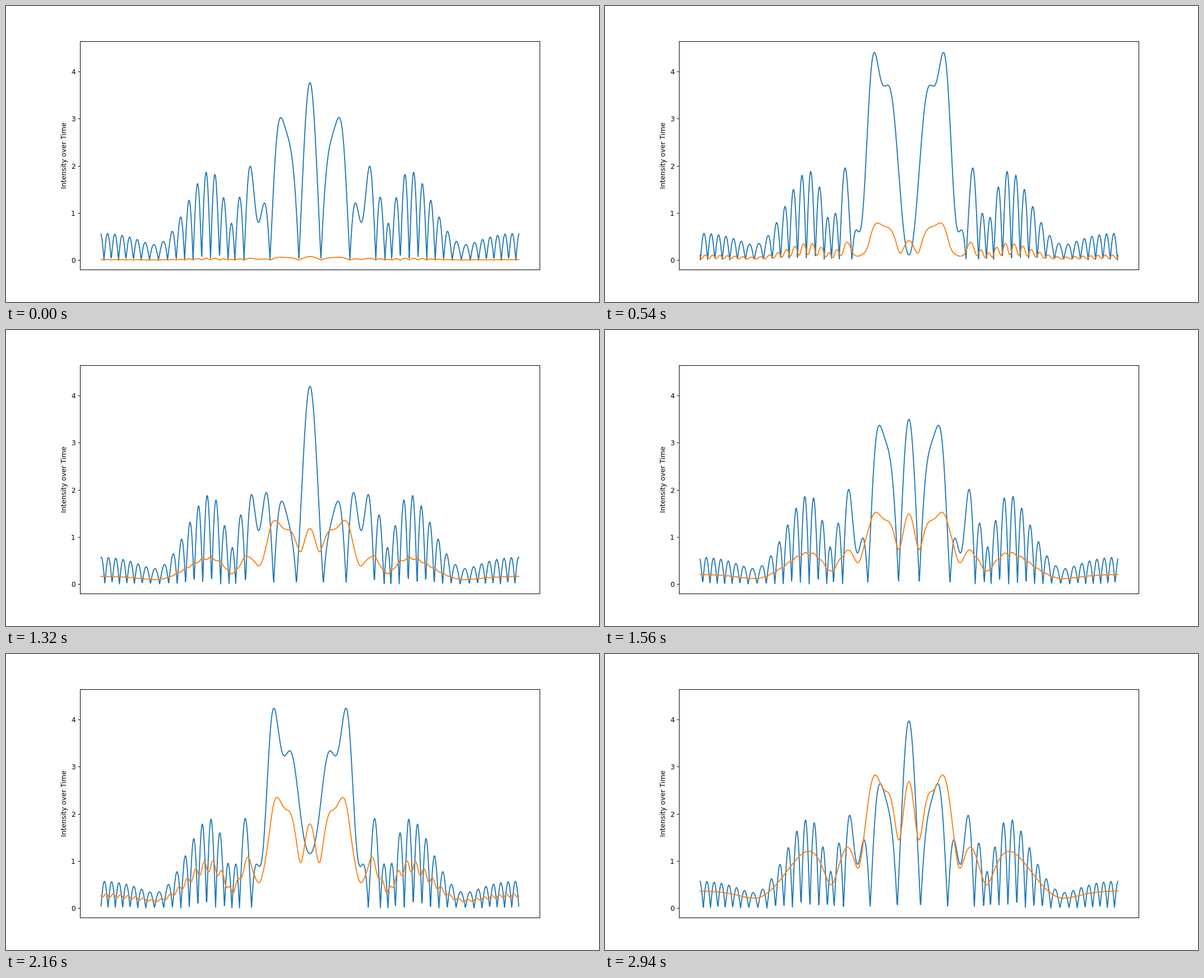
These frames come from a looping animation (1058x529 px, 3000 ms). A matplotlib script:

```python
import numpy as np
import matplotlib.pyplot as plt
from matplotlib.animation import FuncAnimation

FRAMES = 50
INTERVAL = 60

# Two slits, each made of four point emitters half a wavelength apart
WAVELENGTH = 0.628
SCREEN_DISTANCE = 3.9936
HALF_WIDTH = 10
slit = WAVELENGTH * (2 + 0.5 * (np.arange(4) - 1.5))
emitters = np.concatenate([-slit, slit])

x = np.linspace(-HALF_WIDTH, HALF_WIDTH, 1000)
distance = np.hypot(x[:, None] - emitters, SCREEN_DISTANCE)
field = np.exp(2j * np.pi * distance / WAVELENGTH).sum(axis=1)

# One wave period per loop; the running total builds up the mean
turn = np.exp(-2j * np.pi * np.arange(FRAMES) / FRAMES)
wave = np.abs((turn[:, None] * field).imag)
total = np.cumsum(wave, axis=0) / FRAMES

fig, ax = plt.subplots(figsize=(12, 6), dpi=88.1667, facecolor="white")
wave_line, = ax.plot(x, wave[0], color="#1f77b4", lw=1.5)
total_line, = ax.plot(x, total[0], color="#ff7f0e", lw=1.5)
ax.set_ylim(-0.199, 4.635)
ax.set_xticks([])
ax.set_yticks(range(5))
ax.set_ylabel("Intensity over Time")


def update(n):
    wave_line.set_ydata(wave[n])
    total_line.set_ydata(total[n])
    return wave_line, total_line


anim = FuncAnimation(fig, update, frames=FRAMES, interval=INTERVAL,
                     repeat=True, repeat_delay=0)
plt.show()
```
